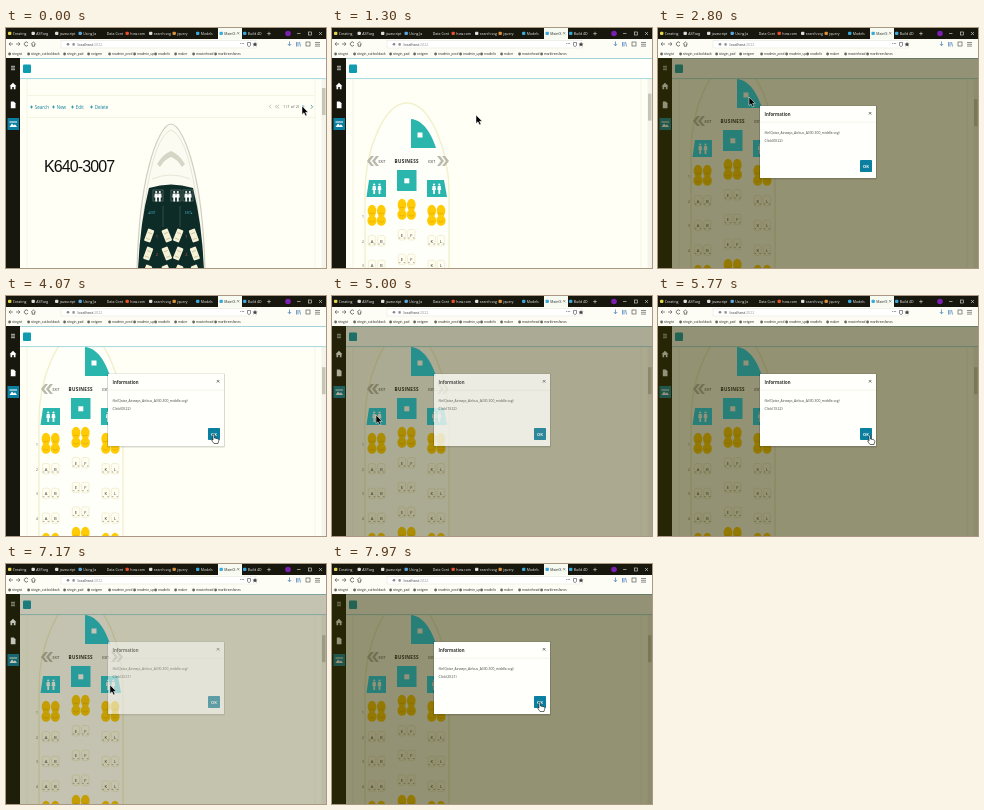
Write an HTML page that moves like this. It is 320 by 240 pixels and loops after 8 s.

```html
<!DOCTYPE html>
<html lang="en">
<head>
<meta charset="utf-8">
<title>Seat map</title>
<style>
  html, body { margin: 0; height: 100%; overflow: hidden; background: #fffff5; }
  svg { display: block; width: 100vw; height: 100vh; font-family: "Open Sans", Roboto, sans-serif; }
</style>
</head>
<body>
<svg id="stage" viewBox="0 0 320 240" preserveAspectRatio="none"></svg>
<script>
// TEAL follows the stage's text colour, which shifts towards blue under the shade
const TEAL = 'currentColor', BLUE = '#0b7f9f', DARK = '#17170d', GOLD = '#ffcb05', PAGE = '#fffff5';

const rect = (x, y, w, h, fill, more = '') =>
  `<rect x="${x}" y="${y}" width="${w}" height="${h}" fill="${fill}" ${more}/>`;
const path = (d, fill, more = '') => `<path d="${d}" fill="${fill}" ${more}/>`;
const line = (d, stroke, w = 0.7) => path(d, 'none', `stroke="${stroke}" stroke-width="${w}"`);
const oval = (x, y, rx, ry, fill) => `<ellipse cx="${x}" cy="${y}" rx="${rx}" ry="${ry}" fill="${fill}"/>`;
const dot = (x, y, r, fill) => oval(x, y, r, r, fill);
const text = (x, y, size, fill, s, more = '') =>
  `<text x="${x}" y="${y}" font-size="${size}" fill="${fill}" ${more}>${s}</text>`;
const group = (id, body, more = '') => `<g id="${id}" ${more}>${body}</g>`;
const MID = ' text-anchor="middle"', BOLD = ' font-weight="700"';

function browser() {
  const tabs = ['Creating', 'ASP.arg', 'javascript', 'Using Ja', 'Data Cont', 'how.com',
    'search.svg', 'jquery', 'Models', 'Main(S', 'Build 4D'];
  const tints = ['#e8d44a', '#ddd', '#ddd', '#5aa7e0', '', '#e8502a', '#ddd', '#d8903a', '#39a9dc', '#39a9dc', '#39a9dc'];
  let s = rect(0, 0, 320, 11, DARK) + rect(212, 0, 24, 11, '#f6faf0');
  tabs.forEach((name, i) => {
    const x = 2 + i * 23.5, active = i === 9;
    if (tints[i]) s += rect(x, 3.7, 3.4, 3.4, tints[i], 'rx="1"');
    s += text(x + 4.8, 6.9, 3.5, active ? '#222' : '#eee', name);
  });
  s += dot(282, 5.5, 2.8, '#7a1fb0') +
    line('M231 4l2.4 2.4M233.4 4L231 6.4', '#555', 0.5) +
    line('M263 3.8v3.6M261.2 5.6h3.6M291 5.5h3.5M313 4l3 3M316 4l-3 3', '#ddd', 0.6) +
    rect(302.5, 4, 3, 3, 'none', 'stroke="#ddd" stroke-width=".6"');

  s += rect(0, 11, 320, 19, '#fdfdf5') + rect(55, 12.5, 195, 7.5, '#fff', 'stroke="#e2e2d6" stroke-width=".5"') +
    line('M7 16H3l1.7-1.8M3 16l1.7 1.8M10 16h4l-1.7-1.8M14 16l-1.7 1.8', '#555') +
    line('M22 15a2 2 0 1 0 0 2M25 16.2l2.4-2.2 2.4 2.2M26.2 16v2.2h2.4V16', '#444') +
    dot(62, 16.2, 1.3, '#888') + rect(66.5, 15.2, 2.2, 2.4, '#888') +
    text(71.5, 17.6, 3.7, '#333', 'localhost<tspan fill="#999">:2022</tspan>') +
    text(234, 17, 4, '#444', '•••') + line('M241.5 14.5v3l1.5 1.2 1.5-1.2v-3z', '#444', 0.6) +
    path('M249 14l.8 1.5 1.7.2-1.3 1.1.4 1.7-1.6-.9-1.6.9.4-1.7-1.3-1.1 1.7-.2z', '#444') +
    line('M283.5 13.5v4M281.8 16l1.7 1.8L285.2 16M290.5 14v4.5M292 14v4.5M293.5 14l1 4.5', '#3778b8') +
    rect(300, 14, 4, 4, 'none', 'stroke="#444" stroke-width=".6"') +
    line('M309 14.5h5M309 16.3h5M309 18.1h5', '#444', 0.6);
  const marks = { 2: 'sitegist', 21: 'sitegin_outlookback', 57: 'sitegin_pad', 81: 'netgem', 102: 'readmin_prod',
    127: 'readmin_up', 148: 'readinfo', 168: 'maker', 186: 'masterhead', 208: 'marktreesfanos' };
  for (const [x, name] of Object.entries(marks))
    s += dot(+x + 1.6, 26, 1.4, '#66665a') + text(+x + 4, 27.3, 3.1, '#222', name);
  return s;
}

const header = () => rect(14, 30, 306, 21, '#fffffb') + line('M0 30.2H320', '#57aebf', 0.8) +
  line('M14 50.6H320', '#7fcad2', 0.7) + rect(17, 36.5, 8, 8.5, '#0f9bb0', 'rx="1"') +
  rect(0, 30, 14, 210, DARK) + line('M5 38.3h4M5 40h4M5 41.7h4', '#fff') +
  path('M3.5 58.3L7 54.8l3.5 3.5h-1v3H7.8V59H6.2v2.3H4.5v-3z', '#fff') +
  path('M4.8 73.5h3l1.7 1.7v5H4.8z', '#fff') +
  rect(1.5, 90, 11.5, 12, BLUE) + path('M3.5 99l2.5-3.5 1.8 2 1.2-1.2 2 2.7zM3.5 93.5h7.5v1H3.5z', '#fff');

function toolbar() {
  let s = line('M21 67.5H309M21 89.5H309', '#eeeed8', 0.6);
  const items = [[24, 'Search'], [46, 'New'], [65, 'Edit'], [84, 'Delete']];
  for (const [x, name] of items)
    s += line(`M${x} 79h3M${x + 1.5} 77.5v3`, BLUE) + text(x + 4.8, 80.6, 4.5, BLUE, name);
  return s + text(277, 80.2, 4, '#666', '1 (1 of 2)') +
    line('M265 76.8l-1.6 1.8 1.6 1.8M271 76.8l-1.6 1.8 1.6 1.8M273 76.8l-1.6 1.8 1.6 1.8', '#999', 0.6) +
    line('M296.5 77l1.6 1.8-1.6 1.8M305 77l1.6 1.8-1.6 1.8', BLUE);
}

const person = (x, y) => dot(x, y - 4, 1.1, '#fff') +
  path(`M${x - 1.5} ${y - 2.5}h3l.4 4h-1v4h-1.8v-4h-1z`, '#fff');

function firstPlane() {
  let s = text(38, 144, 16, '#111', 'K640-3007',
    'style="font-family:\'Liberation Sans\',sans-serif" letter-spacing="-.9"');
  s += path('M131 242C132 200 136 165 143 138C149 114 158 96 165 96S181 114 187 138C194 165 198 200 199 242z',
      '#fbfbf2', 'stroke="#cfcfc2" stroke-width="1.2"') +
    line('M134 232C136 180 144 139 151 121Q158 104 165 102Q172 104 179 121C186 139 194 180 196 232', '#dcdccc') +
    path('M151 136Q157 126 165 123Q173 126 179 136L176 139Q171 131 165 129Q159 131 154 139z', '#d6d6c6') +
    line('M146 151Q165 143 184 151', '#ddddcc') +
    path('M143 160Q165 153 187 160Q196 195 198 242H132Q134 195 143 160z', '#0d2b27');
  for (const x of [147, 165, 177]) {
    s += rect(x, 162, 10, 11, 'none', 'stroke="#70827c" stroke-width=".6"') +
      person(x + 3.2, 168) + person(x + 6.8, 168);
  }
  s += text(142, 186, 3, '#52b8d0', '◂EXIT') + text(179, 186, 3, '#52b8d0', 'EXIT▸') +
    line('M157 178V199M174 178V199', '#49645e', 0.6);
  for (let r = 0; r < 3; r++) {
    const y = 208 + r * 18;
    [[143 - r, 20], [161, -22], [172, 22], [188 + r, -20]].forEach(([x, a]) => {
      s += `<g transform="translate(${x} ${y}) rotate(${a})">` +
        rect(-3.3, -7, 6.6, 13, '#f5f2d8', 'rx="1.2"') + line('M-2 -3h4M-2 3h4', '#b6ad80', 0.6) + '</g>';
    });
    s += text(151, y + 2, 4, '#e25b4b', r + 1, MID) + text(180.5, y + 2, 4, '#e25b4b', r + 1, MID);
  }
  return s;
}

const goldSeat = (x, y) => oval(x, y + 6, 4.3, 6.2, GOLD) + oval(x, y + 15.5, 4.6, 5.3, GOLD) +
  line(`M${x - 2.4} ${y + 8}q2.4 1.6 4.8 0M${x - 2.6} ${y + 16}q2.6 2.4 5.2 0`, '#d9a400', 0.6);

const plainSeat = (x, y, c) =>
  rect(x - 3.7, y - 5.5, 7.4, 10.5, '#fffef0', 'rx="2" stroke="#ece8c4" stroke-width=".7"') +
  line(`M${x - 3.2} ${y + 3}h1.6M${x + 1.6} ${y + 3}h1.6`, '#99967a', 0.8) + text(x, y + 1.5, 4.2, '#333', c, MID);

function secondPlane() {
  const cols = [[40, 6, 'A'], [49.3, 6, 'B'], [70, 0, 'E'], [79.3, 0, 'F'], [99.7, 6, 'K'], [109, 6, 'L']];
  let s = path('M33 420V165C33 122 52 75 75 75S117 122 117 165V420', '#fffffa', 'stroke="#f3f0cc" stroke-width="1.4"') +
    path('M79 91C91 92 99 105 104 120H79z', TEAL) + rect(85.5, 104.5, 5, 5, '#fff') +
    rect(65, 142, 19.5, 21, TEAL) + rect(72.3, 150.3, 5, 5, '#fff') +
    path('M37 152H54V169H34.5z', TEAL) + path('M95 152H112L115 169H95z', TEAL);
  for (const x of [42.2, 47.5, 102, 107.3]) s += person(x, 160.5);
  for (const x of [0, 5]) {
    s += path(`M${39 + x} 128h3l-4 5 4 5h-3l-4-5z`, '#b9b9ac') + path(`M${108 + x} 128h-3l4 5-4 5h3l4-5z`, '#b9b9ac');
  }
  s += text(50, 134.6, 3.5, '#333', 'EXIT', MID) + text(99.7, 134.6, 3.5, '#333', 'EXIT', MID) +
    text(74.7, 135, 4.6, '#222', 'BUSINESS', MID + BOLD + ' letter-spacing=".3"');
  for (const [x, dy, c] of cols) {
    s += goldSeat(x, 171 + dy) + goldSeat(x, 271 + dy);
    for (let r = 0; r < 3; r++) s += plainSeat(x, 207 + dy + r * 24.7, c);
  }
  for (let r = 0; r < 4; r++) s += text(31, 190 + r * 24.7, 3.3, '#555', r + 1, MID);
  return s;
}

const dialog = () => rect(101, 77.5, 118, 74, '#000', 'opacity=".15" rx="1"') +
  rect(102, 78, 116, 72, '#fffffb') + text(106.5, 87.7, 4.3, '#333', 'Information', BOLD) +
  line('M210.8 84l2.6 2.6M213.4 84l-2.6 2.6', '#444') + line('M102 94.3H218', '#eeeedd', 0.6) +
  text(106.5, 106.3, 3.35, '#444', 'file(Qatar_Airways_Airbus_A330-300_middle.svg)') +
  text(106.5, 114, 3.6, '#444', '', 'id="message"') +
  rect(202, 132, 12, 12, BLUE, 'rx=".8"') + text(208, 139.6, 4, '#fff', 'OK', MID + BOLD);

const stage = document.getElementById('stage');
stage.innerHTML =
  `<clipPath id="view"><path d="M14 51H320V240H14z"/></clipPath>` + rect(0, 0, 320, 240, PAGE) +
  `<g clip-path="url(#view)">` + line('M21 51V240M309 51V240', '#efefd9', 0.6) +
  group('page', toolbar() + group('first', firstPlane()) +
    group('second', secondPlane(), 'transform="translate(0 40)"')) + '</g>' +
  rect(315.5, 51, 4.5, 189, '#f4f4ea') + rect(316, 0, 3.5, 27, '#c6c6b8', 'id="thumb"') +
  header() + browser() +
  rect(0, 30, 320, 210, '#343200', 'id="dim"') + group('dialog', dialog()) +
  group('cursor',
    path('M0 0V8.5L2 6.8L3.5 10L5 9.3L3.6 6.3H6.2z', '#000', 'id="arrow" stroke="#fff" stroke-width=".5"') +
    path('M0 .5q1-1 1.5 0V4l3.5.8q1 .5.8 2L5 9.5H1L-1.5 6q.2-1 1.5 0z', '#fff', 'id="hand" stroke="#111" stroke-width=".6"'));

const el = {};
for (const id of ['page', 'first', 'second', 'thumb', 'dim', 'dialog', 'message', 'cursor', 'arrow', 'hand'])
  el[id] = document.getElementById(id);

const ramp = (t, a, b) => Math.min(1, Math.max(0, (t - a) / (b - a)));
const ease = p => p * p * (3 - 2 * p);
const mix = (a, b, p) => a + (b - a) * p;
const show = (node, on) => node.setAttribute('visibility', on ? 'visible' : 'hidden');

const SWAP = 380;
// start, end, x, y: the pointer glides to x,y between start and end
const moves = [[0, 0, 296, 78], [450, 1250, 144, 87], [1680, 2330, 91, 69], [2850, 3750, 207, 138],
  [4220, 4700, 44, 119], [5050, 5680, 211, 139], [5950, 6520, 109, 127], [6570, 6930, 104, 121], [7250, 7960, 207, 138]];
// opening, start of dim fade-out, closing, message
const popups = [[2570, 3950, 4230, 'Click(0)(22)'], [4900, 5800, 6060, 'Click(1)(22)'], [7100, 9000, 9300, 'Click(2)(21)']];

function pointer(t) {
  let [, , x, y] = moves[0];
  for (const [a, b, nx, ny] of moves.slice(1)) {
    const p = ease(ramp(t, a, b));
    x = mix(x, nx, p);
    y = mix(y, ny, p);
  }
  return [x, y];
}

function draw(t) {
  const scroll = 40 * (ease(ramp(t, 920, 1120)) + ease(ramp(t, 1800, 2050)));
  el.page.setAttribute('transform', `translate(0 ${-scroll})`);
  show(el.first, t < SWAP);
  show(el.second, t >= SWAP);
  el.thumb.setAttribute('y', 60 + scroll * 0.14);

  const popup = popups.find(([a, , c]) => t >= a && t < c);
  let shade = 0;
  show(el.dialog, popup);
  if (popup) {
    const [open, fade, close, message] = popup;
    const shown = ramp(t, open, open + 130);
    shade = shown * (1 - ramp(t, fade, fade + 110));
    el.dialog.setAttribute('opacity', shown * (1 - ramp(t, close - 110, close)));
    el.message.textContent = message;
  }
  el.dim.setAttribute('opacity', 0.53 * shade);
  stage.style.color = `rgb(${mix(42, 27, shade)}, ${mix(181, 216, shade)}, ${mix(173, 255, shade)})`;

  const [x, y] = pointer(t);
  const over = popup && x > 202 && x < 214 && y > 132 && y < 144;
  el.cursor.setAttribute('transform', `translate(${x} ${y})`);
  show(el.arrow, !over);
  show(el.hand, over);
}

const start = performance.now();
function tick(now) {
  draw(Math.max(0, now - start) % 8000);
  requestAnimationFrame(tick);
}
draw(0);
requestAnimationFrame(tick);
</script>
</body>
</html>
```
